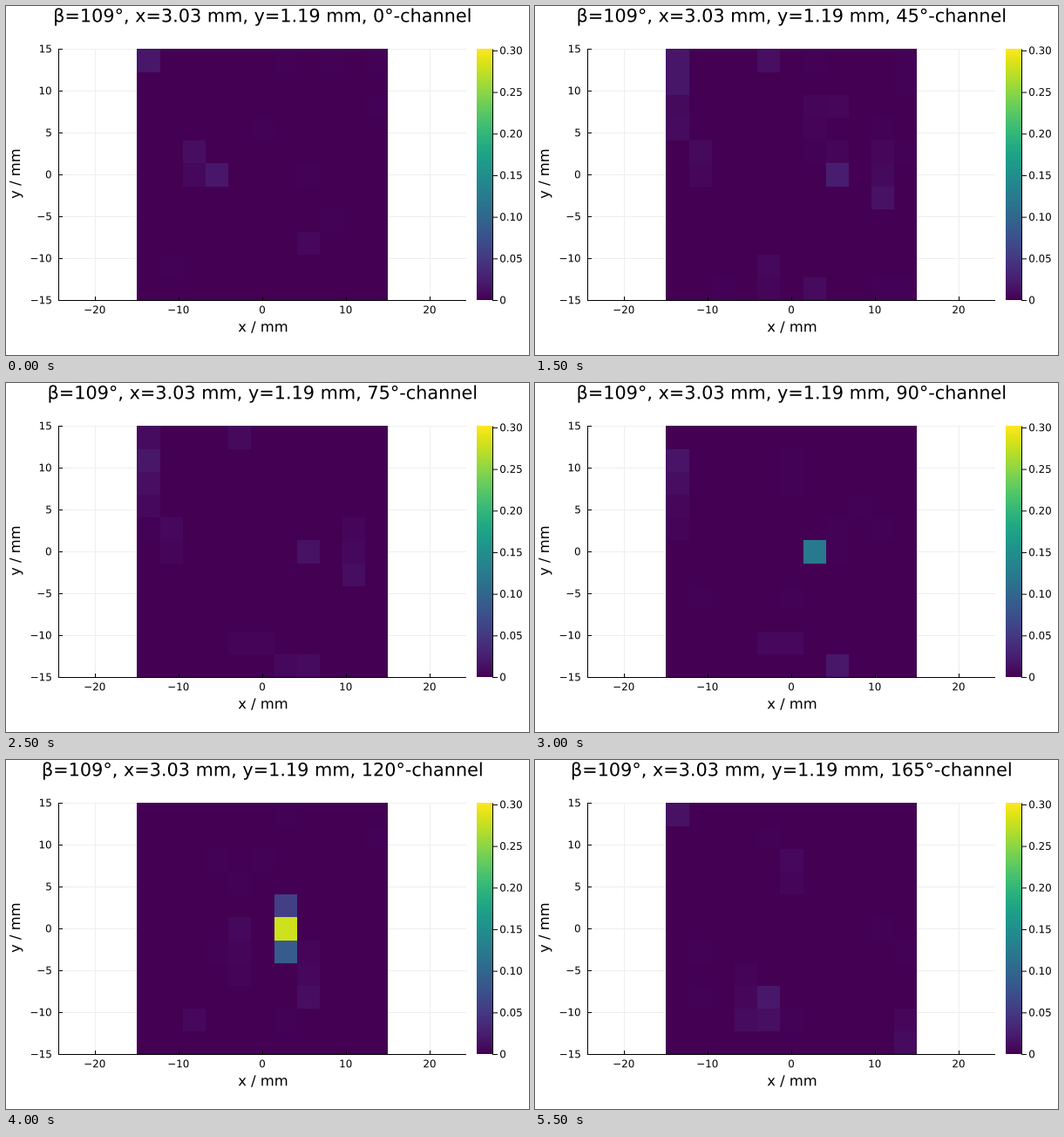
Animation, 600 px wide and 400 px high, one loop 6000 ms. Source, as a matplotlib script:

```python
import numpy as np
import matplotlib.pyplot as plt
from matplotlib.animation import FuncAnimation
from matplotlib.patches import PathPatch
from matplotlib.textpath import TextPath
from matplotlib.transforms import Affine2D

W, H, DPI = 600, 400, 100
LEFT, RIGHT, TOP, BOTTOM = 60.5, 528, 49.5, 337.5
X0, Y0, PX_PER_MM = 294, 193.5, 9.6
CELLS, VMAX, STEP = 11, 0.302, 15
FADE = 0.6
TICK_SIZE, LABEL_SIZE, TITLE_SIZE = 11.9, 16.35, 20.8

plt.rcParams["font.family"] = "DejaVu Sans"


def streaks(angle, *marks):
    """Marks are (column, row, strength, steps): the tail fades downwards,
    or upwards when steps is negative."""
    rng = np.random.default_rng(angle)
    grid = np.zeros((CELLS, CELLS))
    grid[tuple(rng.integers(0, CELLS, (2, 8)))] = 0.002
    for col, row, strength, steps in marks:
        for k in range(abs(steps) + 1):
            grid[row + k * int(np.sign(steps)), col] = strength * FADE ** k
    return grid


key_maps = {
    0: streaks(0, (0, 0, .018, 0), (2, 4, .010, 1), (3, 5, .018, 0),
               (7, 8, .006, 0)),
    15: streaks(15, (0, 0, .018, 1), (6, 2, .012, 3), (7, 2, .016, 0),
                (7, 5, .021, -1), (4, 9, .018, 1), (0, 3, .011, 0)),
    60: streaks(60, (0, 1, .020, 2), (0, 0, .017, 0), (4, 0, .016, 0),
                (1, 4, .012, 1), (7, 5, .025, 0), (9, 6, .020, -2),
                (6, 10, .014, 0)),
    90: streaks(90, (0, 1, .016, 3), (4, 9, .007, 0), (5, 9, .007, 0),
                (7, 10, .018, 0)),
    120: streaks(120, (6, 4, .056, 0), (6, 6, .086, 0), (7, 8, .010, -2),
                 (4, 5, .007, 2), (2, 9, .007, 0)),
    150: streaks(150, (4, 0, .017, 0), (8, 2, .016, 0), (3, 4, .016, 2),
                 (4, 7, .029, -1), (8, 9, .010, 0), (10, 10, .009, 0)),
    165: streaks(165, (0, 0, .013, 0), (5, 2, .007, 1), (4, 8, .018, 1),
                 (3, 9, .009, -2), (10, 10, .009, -1)),
}


def heat_at(angle):
    """Blend the neighbouring key maps and add the source peak."""
    low = max(a for a in key_maps if a <= angle)
    high = min(a for a in key_maps if a >= angle)
    mix = (angle - low) / max(high - low, 1)
    grid = (1 - mix) * key_maps[low] + mix * key_maps[high]
    grid[5, 6] += VMAX * np.exp(-abs((angle - 110) / 20.6) ** 3.5)
    return grid


fig = plt.figure(figsize=(W / DPI, H / DPI), dpi=DPI, facecolor="white")
ax = fig.add_axes([0, 0, 1, 1])
ax.axis("off")


def line(x, y, color="black", z=5):
    ax.plot(x, y, color=color, lw=72 / DPI, zorder=z,
            solid_capstyle="butt", snap=False)


def text_path(x, y, text, size, align=0.5, angle=0):
    """Outline of text with its baseline at y; align 0 is left, 1 right."""
    path = TextPath((0, 0), text, size=size)
    box = path.get_extents()
    shift = -(box.x0 + align * box.width)
    place = Affine2D().translate(shift, 0).scale(1, -1)
    return place.rotate_deg(angle).translate(x, y).transform_path(path)


def label(*args, **kwargs):
    patch = PathPatch(text_path(*args, **kwargs), fc="black", lw=0,
                      zorder=6, snap=False)
    return ax.add_patch(patch)


def number(value):
    return str(value).replace("-", "\u2212")


# Axes, grid and labels
for mm in range(-20, 21, 10):
    x = X0 + mm * PX_PER_MM + 0.5
    line([x, x], [TOP, BOTTOM], "#eeeeee", z=1)
    line([x, x], [BOTTOM - 4.5, BOTTOM])
    label(x - 0.5, 352.3, number(mm), TICK_SIZE)
for mm in range(-15, 16, 5):
    y = Y0 - mm * PX_PER_MM
    line([LEFT, RIGHT], [y, y], "#eeeeee", z=1)
    line([LEFT, LEFT + 4.5], [y, y])
    label(51.8, y + 3.8, number(mm), TICK_SIZE, align=1)
line([LEFT, LEFT], [TOP - 0.5, BOTTOM + 0.5])
line([LEFT - 0.5, RIGHT], [BOTTOM, BOTTOM])
label(294.5, 373.3, "x / mm", LABEL_SIZE)
label(16, 192.6, "y / mm", LABEL_SIZE, angle=-90)

# Colour bar
ax.imshow(np.linspace(1, 0, 256)[:, None], cmap="viridis",
          extent=(540, 558, 337, 49), aspect="auto",
          interpolation="nearest", zorder=2)
line([558.5, 558.5], [TOP, BOTTOM])
for step in range(7):
    value = step * 0.05
    y = BOTTOM - value / VMAX * (BOTTOM - TOP)
    line([558, 564], [y, y])
    label(567, y + 3.8, f"{value:.2f}" if step else "0", TICK_SIZE, align=0)

# Heat map with cell edges on whole pixels
x_edges = np.ceil(np.linspace(150, 438, CELLS + 1))
y_edges = np.ceil(np.linspace(49, 337, CELLS + 1))
heat = ax.pcolormesh(x_edges, y_edges, heat_at(0), cmap="viridis",
                     vmin=0, vmax=VMAX, antialiased=False, zorder=3)
title = label(294.3, 18.3, " 0", TITLE_SIZE)
ax.set(xlim=(0, W), ylim=(H, 0))


def update(i):
    angle = STEP * i
    heat.set_array(heat_at(angle))
    text = f"β=109°, x=3.03 mm, y=1.19 mm, {angle}°-channel"
    title.set_path(text_path(294.3, 18.3, text, TITLE_SIZE))
    return heat, title


anim = FuncAnimation(fig, update, frames=12, interval=500,
                     repeat=True, repeat_delay=0)
plt.show()
```
